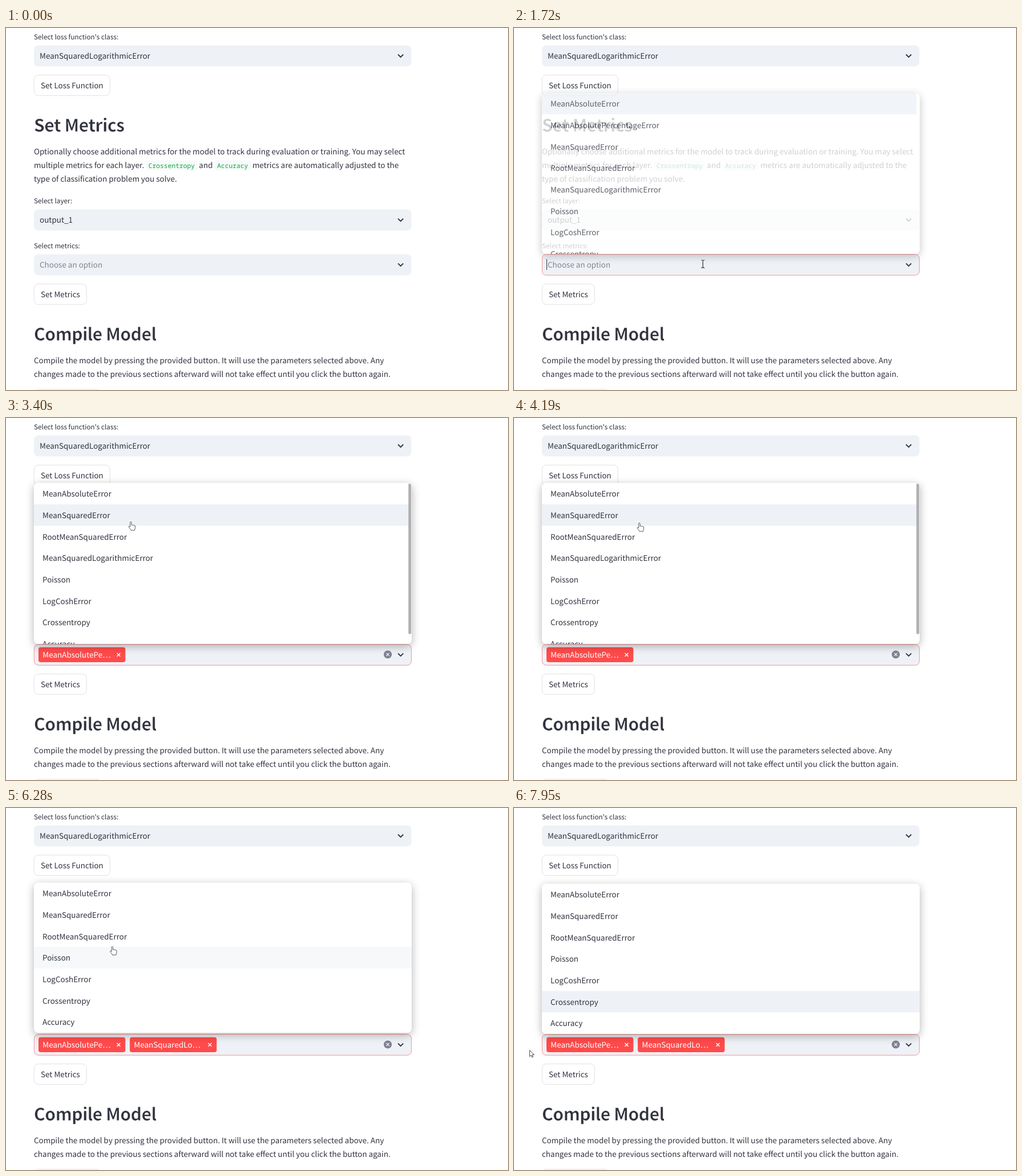
These frames come from a looping animation (881x636 px, 8 s). An HTML page:

```html
<!DOCTYPE html>
<html lang="en">
<head>
<meta charset="utf-8">
<title>Set Metrics</title>
<style>
  html, body { margin: 0; width: 100%; height: 100%; overflow: hidden; background: #fff; }
  svg { position: absolute; left: 0; top: 0; display: block; }
  text {
    font: 13.48px "Noto Sans CJK JP", "Noto Sans CJK SC", "Noto Sans CJK", "Noto Sans", sans-serif;
    fill: #31333f; white-space: pre; text-rendering: geometricPrecision;
  }
  text.label { font-size: 11.8px; }
  text.title {
    font-size: 30.2px; font-weight: 600; letter-spacing: -.017em;
    stroke: #fff; stroke-width: .5;
  }
  text.code { font: 11.3px "Noto Sans Mono", monospace; fill: #09ab3b; }
  text.hint { fill: #83848c; }
  .dots { letter-spacing: .1em; }
  .field { fill: #eef2f6; }
  .button { fill: #fff; stroke: #dfe0e3; stroke-width: .95; }
  .chip { fill: #f8f9fb; }
  .chevron { fill: none; stroke: #31333f; stroke-width: 1.9; }
  .tag rect { fill: #ff4b4b; }
  .tag text { fill: #fff; }
  .cross { fill: none; stroke: #fff; stroke-width: 1.4; }
  #focus { fill: none; stroke: #ff4b4b; stroke-width: .95; opacity: .6; }
  #popover {
    position: absolute; left: 49px; width: 662.5px; overflow: hidden;
    background: #fff; border-radius: 7.5px;
    box-shadow: 0 3.8px 15px rgba(0, 0, 0, .3);
  }
  #thumb { fill: #b0b0b1; }
</style>
</head>
<body>
<svg width="881" height="636" viewBox="0 0 881 636">
  <defs>
    <path id="down" class="chevron" d="M688 -2.4l4.6 4.6 4.6-4.6"/>
    <path id="x" class="cross" d="M-3-3l6 6m0-6l-6 6"/>
  </defs>

  <text class="label" x="49" y="20">Select loss function's class:</text>
  <rect class="field" x="49" y="30.4" width="662.5" height="37" rx="7.5"/>
  <text x="59" y="54.2">MeanSquaredLogarithmicError</text>
  <use href="#down" y="48.9"/>
  <rect class="button" x="49.3" y="82.7" width="133" height="36" rx="7.3"/>
  <text x="61" y="106">Set Loss Function</text>

  <text class="title" x="49" y="182.3">Set Metrics</text>
  <text x="49" y="222.2">Optionally choose additional metrics for the model to track during evaluation or training. You may select</text>
  <text x="49" y="246.3">multiple metrics for each layer.</text>
  <rect class="chip" x="245.5" y="232.5" width="91" height="18" rx="3.8"/>
  <text class="code" x="250" y="246.3">Crossentropy</text>
  <text x="338.6" y="246.3">and</text>
  <rect class="chip" x="366" y="232.5" width="64" height="18" rx="3.8"/>
  <text class="code" x="370.6" y="246.3">Accuracy</text>
  <text x="432.4" y="246.3">metrics are automatically adjusted to the</text>
  <text x="49" y="270.4">type of classification problem you solve.</text>

  <text class="label" x="49" y="308.2">Select layer:</text>
  <rect class="field" x="49" y="318.8" width="662.5" height="37" rx="7.5"/>
  <text x="59" y="342.4">output_1</text>
  <use href="#down" y="337.3"/>

  <text class="label" x="49" y="386.7">Select metrics:</text>
  <rect class="field" x="49" y="397.5" width="662.5" height="37" rx="7.5"/>
  <rect id="focus" x="49.4" y="397.6" width="662" height="36.7" rx="7.3"/>
  <text id="hint" class="hint" x="59" y="421.1">Choose an option</text>
  <rect id="caret" x="57" y="406" width="1" height="19" fill="#31333f"/>
  <use href="#down" y="416"/>
  <g id="tag1" class="tag">
    <rect x="57" y="402.8" width="152.5" height="26.3" rx="3.8"/>
    <text x="64.3" y="421.1">MeanAbsolutePe<tspan class="dots" dx=".6">...</tspan></text>
    <use href="#x" x="197.6" y="416"/>
    <circle cx="670" cy="415.5" r="7.1" fill="#7f8393"/>
    <use href="#x" transform="translate(670 415.5) scale(.85)"/>
  </g>
  <g id="tag2" class="tag">
    <rect x="217.2" y="402.8" width="152.5" height="26.3" rx="3.8"/>
    <text x="224.5" y="421.1">MeanSquaredLo<tspan class="dots" dx=".6">...</tspan></text>
    <use href="#x" x="357.8" y="416"/>
  </g>
  <rect class="button" x="49.3" y="449.6" width="92" height="36" rx="7.3"/>
  <text x="61" y="473">Set Metrics</text>

  <text class="title" x="49" y="548.8">Compile Model</text>
  <text x="49" y="588.8">Compile the model by pressing the provided button. It will use the parameters selected above. Any</text>
  <text x="49" y="612.9">changes made to the previous sections afterward will not take effect until you click the button again.</text>
  <rect class="button" x="49.3" y="634.6" width="117" height="36" rx="7.3"/>
</svg>

<div id="popover">
  <svg width="663" height="283">
    <rect id="active" class="field" height="37.7"/>
    <g id="rows"></g>
    <rect id="thumb" x="657.2" y="1" width="5" rx="2.5"/>
  </svg>
</div>

<svg width="881" height="636" viewBox="0 0 881 636">
  <g id="cursor" stroke-linejoin="round">
    <path data-kind="arrow" d="M0 0V11.2L2.6 8.8 4.3 12.6 6.1 11.8 4.4 8.1H8Z" fill="#fff" stroke="#4a4a4e"/>
    <g data-kind="beam" fill="none">
      <path d="M-3-7q2.5 0 3 1.2q.5-1.2 3-1.2M0-5.8V5.8M-3 7q2.5 0 3-1.2q.5 1.2 3 1.2M-1.5 2.5h3" stroke="#fff" stroke-width="2.6" opacity=".7"/>
      <path d="M-3-7q2.5 0 3 1.2q.5-1.2 3-1.2M0-5.8V5.8M-3 7q2.5 0 3-1.2q.5 1.2 3 1.2" stroke="#2a2a2e" stroke-width="1.2"/>
    </g>
    <path data-kind="hand" transform="scale(.92)" d="M-1.3 9.5V1.2a1.3 1.3 0 0 1 2.6 0V6.2c.2-1 2.4-1 2.5.4c.3-.9 2.3-.8 2.4.5c.3-.7 2.1-.5 2.1.9V11c0 2.5-1 3-1.2 5H.3C0 14.3-2.3 12.6-3.9 9.6C-4.6 8.2-3 7.4-1.3 9.5Z" fill="#fff" stroke="#4a4a4e"/>
  </g>
</svg>

<script>
const LOOP = 8000, ROW = 37.7, LEFT = 49, RIGHT = 711.5, BOTTOM = 397.1;
const OPEN = 1580, PICK1 = 3340, PICK2 = 6150, SCROLLBAR = 2700;
const HOTSPOT = 3; // the hand points a little below its fingertip
const OPTIONS = ['MeanAbsoluteError', 'MeanAbsolutePercentageError', 'MeanSquaredError',
  'RootMeanSquaredError', 'MeanSquaredLogarithmicError', 'Poisson', 'LogCoshError',
  'Crossentropy', 'Accuracy'];

// Pointer paths: [time, x, y]; the pointer is off stage between them.
const PATHS = [
  [[720, 825, 622], [860, 500, 560], [1000, 180, 495], [1120, 18, 450], [1280, 125, 430],
   [1400, 270, 418], [1510, 331.5, 414.5], [2570, 331.5, 414.5], [2640, 330.5, 404],
   [3140, 219, 182.5], [4120, 219, 182.5], [4190, 220, 184.5], [4470, 218, 191.5],
   [4750, 218, 191.5], [5350, 186.5, 243.5], [6610, 186.5, 243.5], [7080, 5, 388], [7140, 5, 388]],
  [[7420, -4, 429], [7950, 27.5, 425.5], [8000, 27.5, 425.5]]
];

const $ = id => document.getElementById(id);
const show = (el, on) => { el.style.display = on ? '' : 'none'; };
const clamp = v => Math.min(1, Math.max(0, v));
const easeOut = v => 1 - (1 - clamp(v)) ** 2;
const between = (t, a, b) => t >= a && t < b;

function pointer(t) {
  const path = PATHS.find(p => between(t, p[0][0], p[p.length - 1][0]));
  if (!path) return null;
  const i = path.findIndex(k => k[0] > t);
  const [t0, x0, y0] = path[i - 1], [t1, x1, y1] = path[i];
  const p = (t - t0) / (t1 - t0);
  return { x: x0 + (x1 - x0) * p, y: y0 + (y1 - y0) * p };
}

function listAt(t) {
  const picked = [t >= PICK1 && OPTIONS[1], t >= PICK2 && OPTIONS[4]];
  const names = OPTIONS.filter(n => !picked.includes(n));
  const top = t < PICK2 ? 114 : 114 + 19.2 * easeOut((t - PICK2 + 30) / 230);
  return { names, top, height: Math.min(283.1, names.length * ROW) };
}

function activeRow(t, p, list) {
  if (t < 2640) return 0;
  if (t > 7000) return 5;
  if (p.y > BOTTOM) return 0;
  const y = p.x < LEFT ? 350 : p.y + HOTSPOT;
  return Math.floor((y - list.top) / ROW);
}

function kindAt(t, p) {
  const inside = p.x > LEFT && p.x < RIGHT;
  if (inside && t > OPEN && p.y < BOTTOM) return 'hand';
  return inside && between(p.y, BOTTOM, 434.5) ? 'beam' : 'arrow';
}

let shown = '';
function fillRows(names) {
  const key = names.join();
  if (key === shown) return;
  shown = key;
  $('rows').innerHTML = names.map((n, i) =>
    `<text x="15" y="${(i + .5) * ROW + 5.3}">${n}</text>`).join('');
}

function draw(t) {
  const p = pointer(t), list = listAt(t);
  const scrolls = list.names.length > 7;

  show($('focus'), t >= OPEN);
  show($('caret'), between(t, OPEN, 2240) || between(t, 2740, 3280));
  show($('hint'), t < PICK1);
  show($('tag1'), t >= PICK1);
  show($('tag2'), t >= PICK2);

  const pop = $('popover');
  show(pop, t >= OPEN);
  pop.style.opacity = easeOut((t - OPEN) / 270);
  pop.style.top = list.top + 'px';
  pop.style.height = list.height + 'px';
  fillRows(list.names);

  const active = $('active');
  active.setAttribute('y', activeRow(t, p, list) * ROW);
  active.setAttribute('width', scrolls ? 657.3 : 663);
  active.style.opacity = t < PICK2 ? 1 : clamp((t - PICK2) / 250);

  show($('thumb'), scrolls && t >= SCROLLBAR);
  $('thumb').setAttribute('height', list.height ** 2 / (list.names.length * ROW) - 1);

  const cursor = $('cursor');
  show(cursor, p);
  if (p) {
    const kind = kindAt(t, p);
    cursor.setAttribute('transform', `translate(${p.x} ${p.y})`);
    for (const el of cursor.children) show(el, el.dataset.kind === kind);
  }
}

const start = performance.now();
function tick() {
  draw((performance.now() - start) % LOOP);
  requestAnimationFrame(tick);
}
tick();
</script>
</body>
</html>
```
